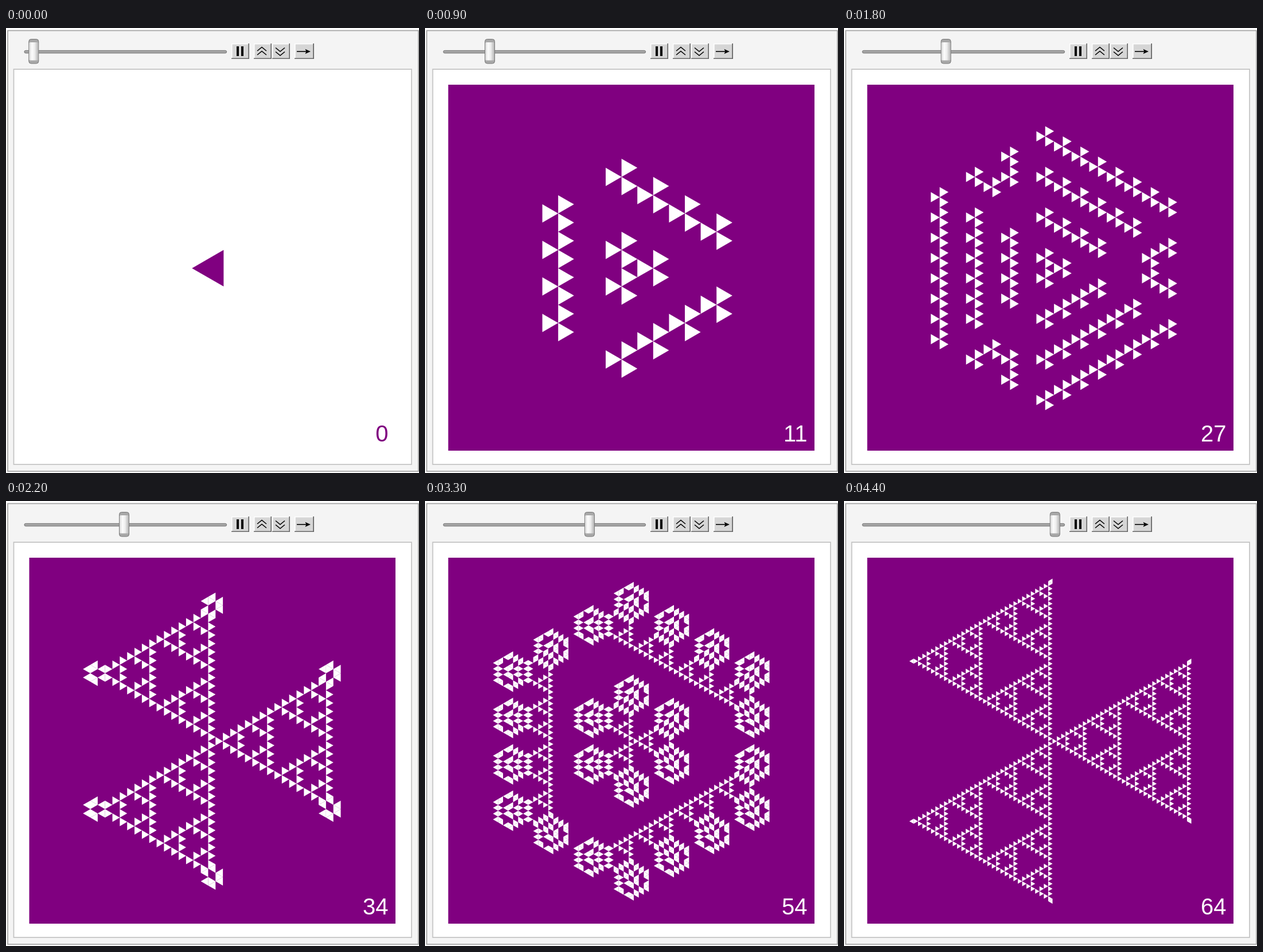
Animation of 720 by 777 pixels, one loop 4500 ms. Source, as an HTML page:

```html
<!DOCTYPE html>
<html lang="en">
<head>
<meta charset="utf-8">
<title>Triangular cellular automaton</title>
<style>
  html, body { margin: 0; width: 100%; height: 100%; overflow: hidden; background: #fff; }
  svg { display: block; width: 720px; height: 777px; }
  text { font: 40px "Liberation Sans", Arial, sans-serif; text-anchor: end; }
</style>
</head>
<body>
<svg viewBox="0 0 720 777">
  <defs>
    <linearGradient id="body">
      <stop offset="0" stop-color="#d6d6d6"/>
      <stop offset=".3" stop-color="#fcfcfc"/>
      <stop offset=".6" stop-color="#eee"/>
      <stop offset="1" stop-color="#b4b4b4"/>
    </linearGradient>
    <g id="button">
      <path d="M0 0H31V27H0Z" fill="#d6d6d6"/>
      <path d="M.75 27V.75H31" fill="none" stroke="#fff" stroke-width="1.5"/>
      <path d="M0 26.2H30.2V0" fill="none" stroke="#666" stroke-width="1.6"/>
    </g>
  </defs>

  <rect x="3" y="4.5" width="716" height="769.5" fill="#f4f4f4" stroke="#a3a3a3" stroke-width="1.7"/>
  <rect x="13.5" y="72" width="693.5" height="690" fill="#fff" stroke="#c2c2c2" stroke-width="1.7"/>

  <rect x="32" y="39.3" width="352.6" height="4.6" rx="2.3" fill="#a6a6a6" stroke="#707070"/>
  <g id="thumb">
    <rect x="-8.5" y="19.5" width="17" height="42.5" rx="4" fill="#a8a8a8" stroke="#777"/>
    <rect x="-8" y="25" width="16" height="31.5" rx="1.5" fill="url(#body)"/>
  </g>

  <use href="#button" x="393" y="27"/>
  <use href="#button" x="432" y="27"/>
  <use href="#button" x="464" y="27"/>
  <use href="#button" transform="translate(503 27) scale(1.097 1)"/>
  <path d="M402 32h4v17h-4ZM410 32h4v17h-4Z"/>
  <g fill="none" stroke="#000" stroke-width="1.6">
    <path d="M438 40l8-6.5 8 6.5M438 47l8-6.5 8 6.5"/>
    <path d="M470 34.5l8 6.5 8-6.5M470 41.5l8 6.5 8-6.5"/>
    <path d="M507 41H526"/>
  </g>
  <path d="M531 41l-9.5-4.2 2 4.2-2 4.2Z"/>

  <rect id="field" x="40.5" y="99" width="638.5" height="639" fill="#800080"/>
  <path id="right"/>
  <path id="left"/>
  <text id="label" x="666.5" y="722"></text>
</svg>
<script>
const FRAME_MS = 100, FRAMES = 45, STOPS = 79, LEAD_IN = 5, LAST = 64;
const PURPLE = "#800080";
const CENTER = [361, 419.4];
const $ = id => document.getElementById(id);

// Cell centroids on an integer lattice: x in thirds of a width, y in half sides.
// Cells with x divisible by 3 point left; their neighbours point right.
const DIRECTIONS = [[2, 0], [-1, 1], [-1, -1]];
const pointsLeft = x => x % 3 === 0;

function neighbours([x, y]) {
  const sign = pointsLeft(x) ? 1 : -1;
  return DIRECTIONS.map(([dx, dy]) => [x + sign * dx, y + sign * dy]);
}

// Parity of a cell and its neighbours, except that an empty cell with three stays empty.
function evolve(cells) {
  const tally = new Map();
  const add = (cell, self) => {
    const key = cell.join();
    const entry = tally.get(key) || { cell, self: 0, around: 0 };
    if (self) entry.self = 1; else entry.around++;
    tally.set(key, entry);
  };
  for (const cell of cells) {
    add(cell, true);
    neighbours(cell).forEach(n => add(n, false));
  }
  return [...tally.values()]
    .filter(({ self, around }) => (self + around) % 2 && around < 3)
    .map(entry => entry.cell);
}

const states = [[[0, 0]], DIRECTIONS];
while (states.length <= LAST) states.push(evolve(states[states.length - 1]));

function trianglePath(cells, step) {
  const side = 637.5 / (Math.max(step, 1) + 9);
  const ux = side * Math.sqrt(3) / 6, uy = side / 2;
  const px = x => (CENTER[0] + x * ux).toFixed(2);
  const py = y => (CENTER[1] - y * uy).toFixed(2);
  return cells.map(([x, y]) => {
    const d = pointsLeft(x) ? -1 : 1;
    return `M${px(x + 2 * d)} ${py(y)}L${px(x - d)} ${py(y + 1)}V${py(y - 1)}Z`;
  }).join("");
}

let shownStep = -1;
function showStep(step) {
  if (step === shownStep) return;
  shownStep = step;
  const ink = step ? "#fff" : PURPLE;
  const cells = states[step];
  $("field").setAttribute("visibility", step ? "visible" : "hidden");
  $("left").setAttribute("d", trianglePath(cells.filter(c => pointsLeft(c[0])), step));
  $("right").setAttribute("d", trianglePath(cells.filter(c => !pointsLeft(c[0])), step));
  for (const id of ["left", "right", "label"]) $(id).setAttribute("fill", ink);
  $("label").textContent = step;
}

function render(ms) {
  const frame = Math.floor(ms / FRAME_MS) % FRAMES;
  const stop = Math.ceil(frame * STOPS / (FRAMES - 1) - 0.5);
  $("thumb").setAttribute("transform", `translate(${48.3 + stop * 319.5 / STOPS} 0)`);
  showStep(Math.min(LAST, Math.max(0, stop - LEAD_IN)));
}

const start = performance.now();
function tick() {
  render(performance.now() - start);
  requestAnimationFrame(tick);
}
tick();
</script>
</body>
</html>
```
